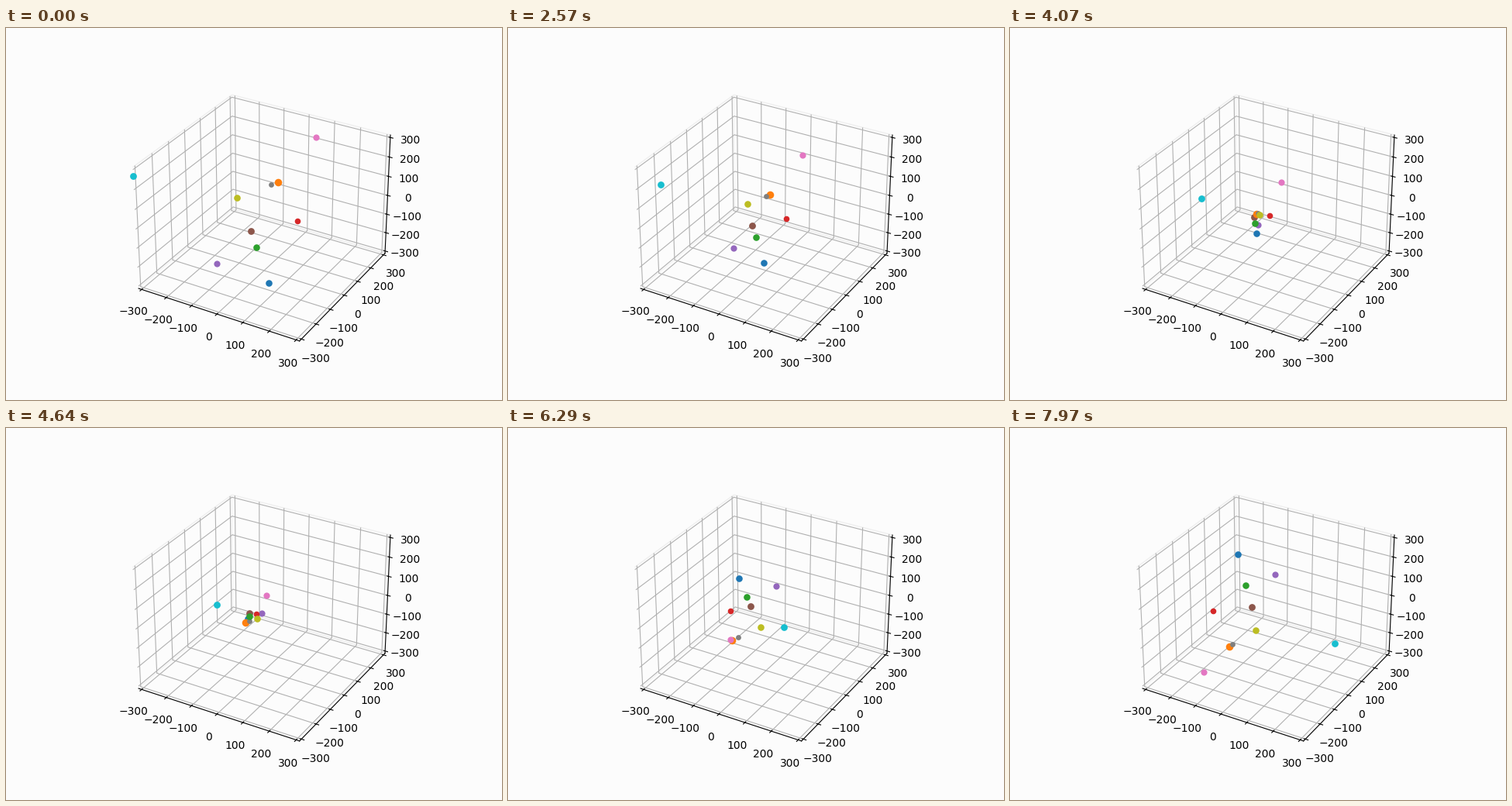
These frames come from a looping animation (640 by 480 pixels, 8 s). A matplotlib script:

```python
import numpy as np
import matplotlib.pyplot as plt
from matplotlib.animation import FuncAnimation

W, H, DPI = 640, 480, 100
LOOP_MS, INTERVAL, STEP_MS = 8000, 20, 30
LAST_STEP = LOOP_MS // STEP_MS
BACKGROUND = "#fcfcfc"
CENTRE = np.array([312, 240])


def body(colour, size, start, turn, rebound=2):
    """A dot of `size` px falling from `start` and passing CENTRE at `turn`.

    `turn` is a share of the loop for x and y; `rebound` is how strongly the
    pull changes once the dot has passed (2 is a plain reversal).
    """
    return dict(colour="tab:" + colour, size=size, start=np.array(start),
                turn=np.array(turn), rebound=np.array(rebound))


# Listed from back to front.
BODIES = [
    body("purple", 8.2, (271, 303), (0.465, 0.574), 2.2),
    body("brown", 8.8, (315, 261), (0.95, 0.564), 2.8),
    body("blue", 8.6, (338, 328), (0.58, 0.602), (2.4, 2)),
    body("orange", 9.6, (350, 198), (0.554, 0.512), (2.3, 2)),
    body("gray", 6.8, (341, 201), (0.60, 0.52)),
    body("green", 8.6, (322, 282), (0.63, 0.60)),
    body("red", 7.6, (375, 248), (0.64, 0.58), (2, 2.6)),
    body("olive", 8.6, (297, 218), (0.37, 0.51), 2.08),
    body("pink", 8.2, (399, 140), (0.68, 0.67)),
    body("cyan", 8.8, (163, 190), (0.682, 0.67)),
]


def position(dot, t):
    """Steady acceleration to the centre, then a steady pull back."""
    past = np.maximum(t - dot["turn"], 0)
    fall = (t ** 2 - dot["rebound"] * past ** 2) / dot["turn"] ** 2
    return dot["start"] + (CENTRE - dot["start"]) * fall + 0.5


def render_box(fig):
    """Draw the empty 3D box once and return it as an image."""
    ax = fig.add_subplot(projection="3d", facecolor=BACKGROUND)
    limit = 300 * 25 / 24
    ax.set(xlim=(-limit, limit), ylim=(-limit, limit), zlim=(-limit, limit))
    for axis in (ax.xaxis, ax.yaxis, ax.zaxis):
        axis.set_ticks(range(-300, 301, 100))
        axis.set_pane_color(BACKGROUND)
        axis.pane.set_edgecolor("#efefef")
    fig.canvas.draw()
    image = np.array(fig.canvas.buffer_rgba())
    ax.remove()
    return image


fig = plt.figure(figsize=(W / DPI, H / DPI), dpi=DPI, facecolor=BACKGROUND)
box = render_box(fig)
stage = fig.add_axes([0, 0, 1, 1])
stage.axis("off")
stage.imshow(box, extent=(0, W, H, 0), aspect="auto", interpolation="nearest")

markers = [stage.scatter(*dot["start"], s=(dot["size"] * 72 / DPI) ** 2,
                         c=dot["colour"], linewidths=0, zorder=3)
           for dot in BODIES]
stage.set(xlim=(0, W), ylim=(H, 0))


def update(frame):
    step = min((frame * INTERVAL + 20) // STEP_MS, LAST_STEP)
    for marker, dot in zip(markers, BODIES):
        marker.set_offsets([position(dot, step / LAST_STEP)])
    return markers


anim = FuncAnimation(fig, update, frames=LOOP_MS // INTERVAL, interval=INTERVAL,
                     repeat=True, repeat_delay=0, blit=False)
plt.show()
```
